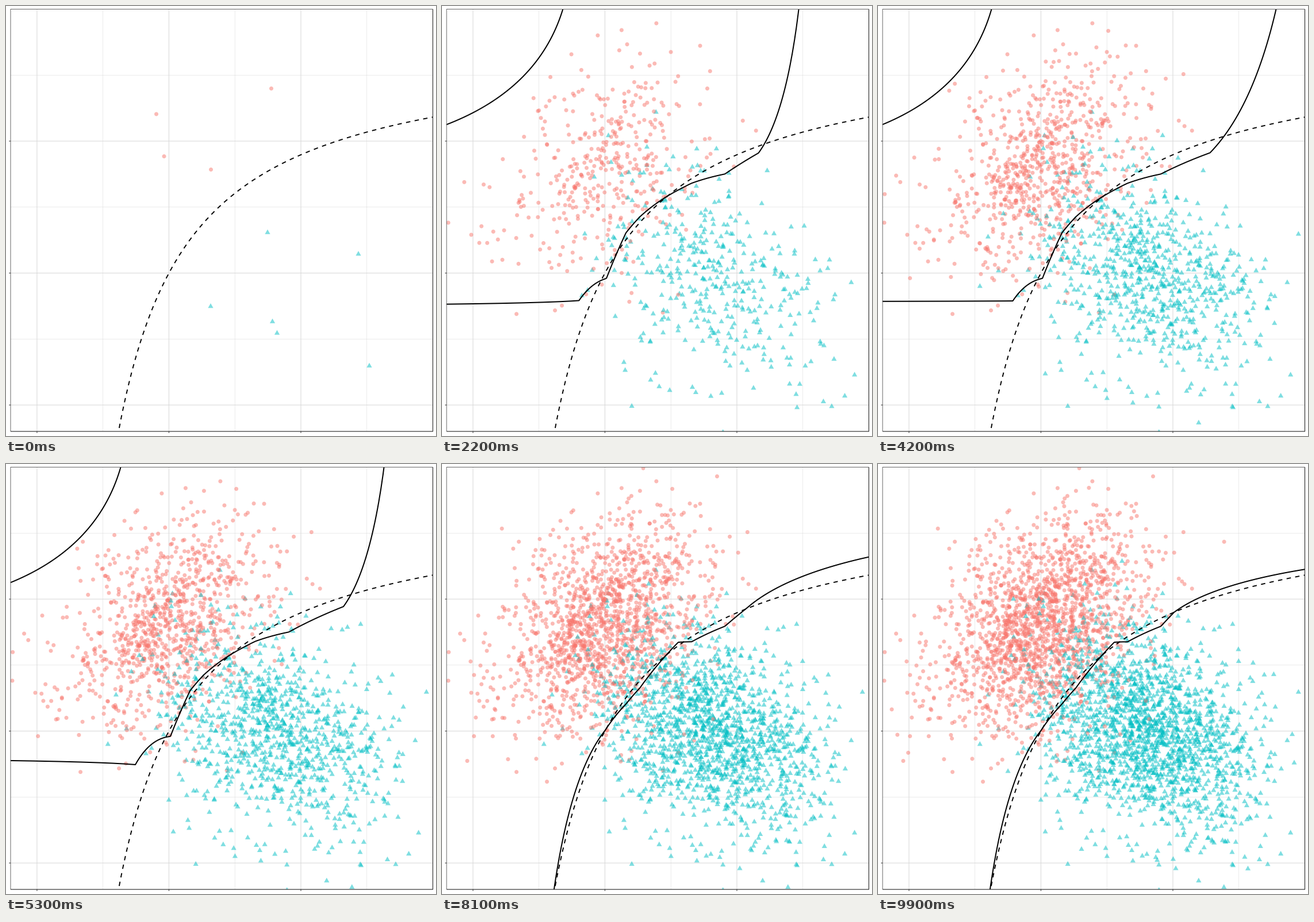
A matplotlib script that plays this animation: 748 px wide and 748 px high, repeating every 10000 ms.

```python
import numpy as np
import matplotlib.pyplot as plt
from matplotlib.animation import FuncAnimation
from matplotlib.collections import PathCollection
from matplotlib.patches import Rectangle
from matplotlib.path import Path
from matplotlib.transforms import Affine2D, IdentityTransform

SIZE, DPI, FRAMES = 748, 100, 100
LEFT, TOP, SIDE = 8.0, 5.5, 734.5
RIGHT, BOTTOM = LEFT + SIDE, TOP + SIDE
LOW, UNIT = -3, SIDE / 8          # both axes run from -3 to 5
CORR, PER_FRAME = 0.3, 37
COLORS = [(0.973, 0.463, 0.427, 0.5), (0.0, 0.749, 0.769, 0.5)]


def px(x, y):
    return np.array([LEFT + (x - LOW) * UNIT, BOTTOM - (y - LOW) * UNIT]).T


def pt(width):
    return width * 72 / DPI


def make_samples():
    """Two normal clouds with opposite correlation; ten samples come first."""
    first = [(261.5, 188), (461.5, 143.5), (275, 261.5), (356.5, 284.5),
             (455, 393.5), (613, 431), (356, 522), (463.5, 548.5),
             (471.5, 568.5), (632, 625.5)]
    rng = np.random.default_rng(12)
    count = PER_FRAME * (FRAMES - 1)
    a, b = rng.standard_normal((2, count))
    kind = np.arange(count) % 2
    x = a + 2 * kind
    y = np.where(kind, -CORR, CORR) * a + np.sqrt(1 - CORR ** 2) * b + 2 * (1 - kind)
    return np.vstack([first, px(x, y)]), np.r_[np.arange(10) > 3, kind]


def truth(x):
    """Height in pixels of the ideal class border, a hyperbola."""
    u = (x - LEFT) / UNIT + LOW
    return px(u, (1 + CORR) * u / (CORR * u + 1 - CORR))[..., 1]


# ---- fitted border: wobbles around the ideal one, with a bent tail each side ----
BENDS = np.array([286, 320, 344, 411, 434, 492])
EARLY = np.array([14, -12, -10, 4, 8, 24])
LATE = np.array([0, 11, 13, -6, 9, 14])
FITS = {  # left tail end, left joint, right joint, right tail end
    13: [(-200, 526), (234, 520), (534, 250), (517, -120)],
    32: [(-200, 514), (243, 504), (569, 262), (760, -130)],
    53: [(-200, 514), (225, 523), (587, 248), (672, -150)],
    65: [(-200, 655), (224, 577), (530, 250), (960, 122)],
    81: [(178, 900), (284, 463), (531, 250), (960, 130)],
    99: [(178, 900), (284, 463), (515, 258), (960, 160)],
}
TIMES, POINTS = list(FITS), np.array(list(FITS.values()), float)
T = np.linspace(0, 1, 40)[:, None]


def bezier(a, c, b):
    return (1 - T) ** 2 * a + 2 * T * (1 - T) * c + T ** 2 * b


def tail(joint, end):
    # flat tails level off, steep tails straighten up
    dx, dy = end - joint
    flat = (dx * dx - dy * dy) / (dx * dx + dy * dy)
    return bezier(joint, (joint + end) / 2 + 0.3 * flat * np.array([-dx, dy]), end)


def border(k):
    pts = [[np.interp(k, TIMES, POINTS[:, i, j]) for j in (0, 1)] for i in range(4)]
    left_end, left, right, right_end = np.array(pts)
    late = np.clip((k - 65) / 16, 0, 1)
    wobble = EARLY + (LATE - EARLY) * late
    x = np.linspace(left[0], right[0], 300)
    gaps = [left[1] - truth(left[0]), *wobble, right[1] - truth(right[0])]
    y = truth(x) + np.interp(x, [left[0], *BENDS, right[0]], gaps)
    return np.vstack([tail(left, left_end)[::-1], np.column_stack([x, y]),
                      tail(right, right_end)])


def corner(k):
    reach = np.interp(k, [13, 32, 53, 65, 75], [224, 196, 200, 120, -80])
    drop = min(207, reach + 70)
    return bezier(np.array([6, drop]), np.array([0.8 * reach, 0.7 * drop]),
                  np.array([reach, 4]))


# ---- stage ----
fig = plt.figure(figsize=(SIZE / DPI, SIZE / DPI), dpi=DPI, facecolor="white")
ax = fig.add_axes([0, 0, 1, 1])
ax.set_xlim(0, SIZE)
ax.set_ylim(SIZE, 0)
ax.axis("off")


def rule(xs, ys, color, width, z):
    ax.plot(xs, ys, color=color, lw=pt(width), zorder=z,
            solid_capstyle="butt", snap=False)


for step in range(6):
    major = step % 2 == 0
    width, z = (1.07, 1) if major else (0.53, 0)
    at = -2.5 + 1.25 * step
    gx, gy = px(at, at)
    rule([gx, gx], [TOP, BOTTOM], "#dadada", width, z)
    rule([LEFT, RIGHT], [gy, gy], "#dadada", width, z)
    if major:
        rule([gx, gx], [BOTTOM, BOTTOM + 2.7], "#333333", 1.07, 5)
        rule([LEFT - 2.7, LEFT], [gy, gy], "#333333", 1.07, 5)

# the frame is thinner on its left and top sides
rule([LEFT, LEFT, RIGHT], [BOTTOM, TOP, TOP], "#333333", 0.75, 6)
rule([LEFT, RIGHT, RIGHT], [BOTTOM, BOTTOM, TOP], "#333333", 1.2, 6)
panel = Rectangle((LEFT, TOP), SIDE, SIDE, fill=False, lw=0)
ax.add_patch(panel)

spots, kinds = make_samples()
circle = Path.unit_circle().transformed(Affine2D().scale(3.5))
triangle = Path([(-4.6, -3.3), (4.6, -3.3), (0, 4.9), (-4.6, -3.3)], closed=True)
shapes = [(circle, triangle)[k] for k in kinds]
dots = PathCollection(shapes[:1], offsets=spots[:1], offset_transform=ax.transData,
                      transform=IdentityTransform(), linewidths=0,
                      facecolors=[COLORS[k] for k in kinds], zorder=2)
ax.add_collection(dots, autolim=False)

xs = np.linspace(170, RIGHT, 500)
ideal, = ax.plot(xs, truth(xs), color="black", lw=pt(1.9), ls=(0, (4, 4)), zorder=4)
fit, = ax.plot([], [], color="black", lw=pt(2), zorder=3)
arc, = ax.plot([], [], color="black", lw=pt(2), zorder=3)
for art in (dots, ideal, fit, arc):
    art.set_clip_path(panel)


def draw(k):
    n = 10 + PER_FRAME * k
    dots.set_paths(shapes[:n])
    dots.set_offsets(spots[:n])
    fit.set_data(*border(k).T)
    arc.set_data(*corner(k).T)
    for line in (fit, arc):
        line.set_visible(k > 0)
    return dots, fit, arc


anim = FuncAnimation(fig, draw, frames=FRAMES, interval=100, repeat=True)
plt.show()
```
